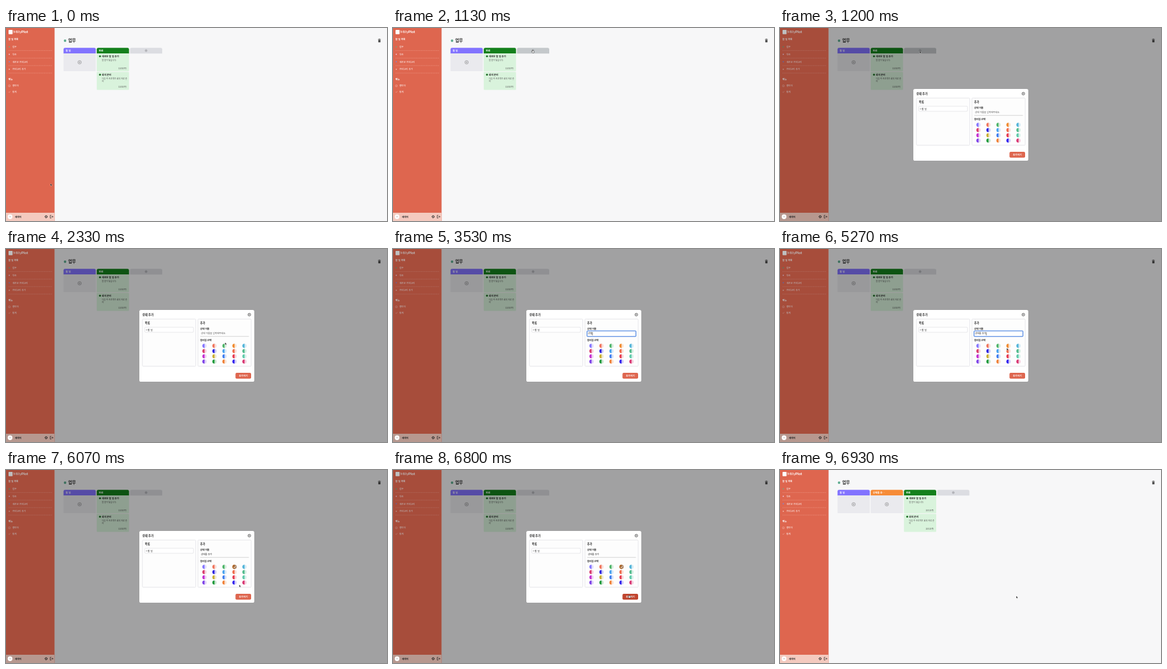
An HTML page for the animation above (7 s loop, 600 by 304 pixels).

```html
<!DOCTYPE html>
<html lang="ko">
<head>
<meta charset="utf-8">
<title>할 일 보드</title>
<style>
html, body { margin: 0; width: 100%; height: 100%; overflow: hidden; background: #f7f7f8; }
svg { display: block; width: 100vw; height: 100vh; }
text { font-family: "Noto Sans CJK KR", "Noto Sans CJK", "Noto Sans CJK JP", "Noto Sans", sans-serif; white-space: pre; }
.logo { font-family: Lato, "Open Sans", sans-serif; }
</style>
</head>
<body>
<svg id="stage" viewBox="0 0 600 304" preserveAspectRatio="none"></svg>
<script>
const stage = document.getElementById('stage');
const LOOP = 7000;
const CORAL = '#de664f';

function add(parent, tag, attrs = {}) {
  const node = document.createElementNS(stage.namespaceURI, tag);
  for (const key in attrs) node.setAttribute(key, attrs[key]);
  parent.append(node);
  return node;
}
const group = (parent, attrs) => add(parent, 'g', attrs);
const rect = (parent, x, y, width, height, fill, extra) =>
  add(parent, 'rect', { x, y, width, height, fill, ...extra });
const dot = (parent, cx, cy, r, fill, extra) => add(parent, 'circle', { cx, cy, r, fill, ...extra });
const path = (parent, d, extra) => add(parent, 'path', { d, fill: 'none', ...extra });

// y is the middle of the line
function label(parent, x, y, string, size, fill, weight = 400, extra) {
  const node = add(parent, 'text', {
    x, y: y + size * 0.36, 'font-size': size, fill, 'font-weight': weight, ...extra
  });
  node.textContent = string;
  return node;
}
function plus(parent, x, y, r, color) {
  dot(parent, x, y, r, 'none', { stroke: color, 'stroke-width': 0.55 });
  const a = r * 0.5;
  path(parent, `M${x - a} ${y}h${2 * a}M${x} ${y - a}v${2 * a}`, { stroke: color, 'stroke-width': 0.55 });
}
const roundTop = (x, y, w, h, r) =>
  `M${x} ${y + h}v${r - h}q0 ${-r} ${r} ${-r}h${w - 2 * r}q${r} 0 ${r} ${r}v${h - r}z`;

function drawSidebar() {
  const bar = group(stage);
  rect(bar, 0, 0, 76.5, 304, CORAL);
  rect(bar, 4, 3, 6.4, 6.8, '#fff', { rx: 0.8 });
  label(bar, 11.4, 6.3, 'Milly', 6, '#fff', 400, { class: 'logo' });
  label(bar, 24, 6.3, 'Plot', 6, '#fff', 700, { class: 'logo' });
  label(bar, 3.8, 17.6, '할 일 목록', 3.7, '#fff', 700);
  const items = [
    ['업무', 29.6, '#58b98c'], ['약속', 41.4, '#f3c9e4'],
    ['새로운 카테고리', 53.2, '#7f86d8'], ['카테고리 추가', 65, '#f2b7a8']
  ];
  for (const [name, y, color] of items) {
    dot(bar, 5.2, y, 0.9, color);
    label(bar, 10, y, name, 3.65, '#fff', 500);
    path(bar, `M4 ${y + 6}H73`, { stroke: '#f0a494', 'stroke-width': 0.5, 'stroke-dasharray': '1 .6' });
  }
  label(bar, 3.8, 81, '메뉴', 3.7, '#fff', 700);
  label(bar, 10, 91, '캘린더', 3.65, '#fff', 500);
  label(bar, 10, 100.5, '통계', 3.65, '#fff', 500);
  rect(bar, 4, 89.8, 2.6, 2.6, 'none', { stroke: '#f6c5ba', 'stroke-width': 0.5, rx: 0.4 });
  path(bar, 'M4 100.6l1 1 1.7-2', { stroke: '#f6c5ba', 'stroke-width': 0.5 });

  rect(bar, 0, 291, 76.5, 13, '#f4cabf');
  label(bar, 14, 297.3, '새싹이', 3.75, '#222', 700);
  dot(bar, 63.2, 297.2, 1.8, 'none', { stroke: '#222', 'stroke-width': 1, 'stroke-dasharray': '1 .4' });
  dot(bar, 63.2, 297.2, 1.3, 'none', { stroke: '#222', 'stroke-width': 0.6 });
  path(bar, 'M71.4 295h-1.8v4.4h1.8M71 297.2h3M72.9 295.9l1.3 1.3-1.3 1.3', { stroke: '#222', 'stroke-width': 0.65 });
}

function drawColumn(parent, x, name, color) {
  path(parent, roundTop(x, 31.2, 50.8, 9, 2.4), { fill: color });
  label(parent, x + 3.3, 35.6, name, 3.8, '#fff', 700);
}
function drawEmptyBody(parent, x) {
  rect(parent, x, 40, 50.8, 28, '#eaeaee', { rx: 0.8 });
  plus(parent, x + 25.3, 54, 2.7, '#777');
}
function drawCard(parent, y, title, lines, date) {
  rect(parent, 142.9, y, 50.8, 28.2, '#d9f3dc', { rx: 1 });
  dot(parent, 148, y + 4.4, 1.5, '#15681d');
  label(parent, 151, y + 4.4, title, 3.7, '#222', 700);
  lines.forEach((line, i) => label(parent, 151, y + 10.6 + i * 4.3, line, 3.2, '#555'));
  label(parent, 190, y + 23.4, date, 3.1, '#444', 400, { 'text-anchor': 'end' });
}

function drawBoard() {
  dot(stage, 93, 20, 1.9, '#58a98c');
  label(stage, 98, 19.6, '업무', 6.6, '#222', 700);
  path(stage, 'M585.8 18h4.4M587.1 17.4h1.8', { stroke: '#333', 'stroke-width': 0.8 });
  rect(stage, 586.3, 18.9, 3.4, 3.7, '#444', { rx: 0.5 });

  drawColumn(stage, 90.6, '할 일', '#8273ff');
  drawEmptyBody(stage, 90.6);

  const fresh = group(stage);
  drawColumn(fresh, 142.9, '상태를 추…', '#f68b37');
  drawEmptyBody(fresh, 142.9);

  const rest = group(stage);
  drawColumn(rest, 142.9, '완료', '#14801c');
  drawCard(rest, 40, '새로운 할 일 추가', ['할 말이 많습니다.'], '10/10(목)');
  drawCard(rest, 69.2, '회의 준비', ['다음 주 프로젝트 회의 자료 준', '비'], '10/10(목)');
  const adder = path(rest, roundTop(195.2, 31.2, 50.8, 9, 2.4), { fill: '#dcdde2' });
  plus(rest, 220.6, 35.6, 1.6, '#8a8a90');
  return { fresh, rest, adder };
}

const CHIPS = [
  '#8273ff', '#f0735a', '#4fb56a', '#f08a2e', '#4fb3d9',
  '#d93a6a', '#2b22e0', '#4aa3ef', '#ef6a4a', '#4fb98a',
  '#c22ad0', '#c9ad2f', '#3f7ff0', '#e63a50', '#5cc9a8',
  '#7c3fe8', '#1f9a3a', '#f0823a', '#3222ef', '#d93370'
];
function drawChip(parent, x, y, color) {
  const r = 3.3;
  dot(parent, x, y, r, color, { opacity: 0.22 });
  path(parent, `M${x} ${y - r}a${r} ${r} 0 0 0 0 ${2 * r}z`, { fill: color });
}

function drawModal() {
  const modal = group(stage);
  rect(modal, 76.5, 0, 523.5, 304, '#000', { opacity: 0.35 });
  rect(modal, 0, 0, 76.5, 304, '#000', { opacity: 0.25 });
  rect(modal, 210, 96, 181, 113, '#fff', { rx: 2.6 });
  label(modal, 214.8, 103.3, '상태 추가', 4.4, '#222', 700);
  dot(modal, 383.2, 103.4, 2.2, 'none', { stroke: '#222', 'stroke-width': 0.6 });
  path(modal, 'M382.2 102.4l2 2m0-2l-2 2', { stroke: '#222', 'stroke-width': 0.6 });

  const frame = { stroke: '#dedee2', 'stroke-width': 0.7, rx: 1.2 };
  rect(modal, 214.8, 110.3, 84, 74.4, '#fdfdfd', frame);
  rect(modal, 302.2, 110.3, 84, 74.4, '#fdfdfd', frame);
  label(modal, 218.8, 116.4, '목록', 4.3, '#222', 600);
  rect(modal, 218.6, 123.2, 76.6, 8, '#fff', frame);
  dot(modal, 221.2, 127.3, 0.6, '#444');
  label(modal, 223, 127.2, '할 일', 3.7, '#222', 500);

  label(modal, 305.8, 116.4, '추가', 4.3, '#222', 600);
  label(modal, 305.8, 125.4, '상태 이름', 3.65, '#222', 600);
  const line = path(modal, 'M306 137.7H382.5', { stroke: '#bbb', 'stroke-width': 0.6 });
  const ring = rect(modal, 305.6, 129, 77, 8.8, '#fff', { stroke: '#2f70dc', 'stroke-width': 1, rx: 0.6 });
  const field = label(modal, 307, 133.1, '', 3.6, '#222');
  const caret = rect(modal, 0, 131, 0.6, 5, '#222');
  label(modal, 305.8, 143.4, '컬러칩 선택', 3.65, '#222', 600);
  CHIPS.forEach((color, i) =>
    drawChip(modal, 312.6 + (i % 5) * 15.75, 152.6 + Math.floor(i / 5) * 8.2, color));
  const check = group(modal);
  dot(check, 359.9, 152.6, 3.3, '#7d4a20', { opacity: 0.65 });
  path(check, 'M358.2 152.7l1.3 1.4 2.3-2.8', { stroke: '#fff', 'stroke-width': 0.9 });

  const button = rect(modal, 361.4, 195, 24.6, 9.2, CORAL, { rx: 2 });
  label(modal, 373.7, 199.4, '추가하기', 3.75, '#fff', 700, { 'text-anchor': 'middle' });
  return { modal, line, ring, field, caret, check, button };
}

function drawCursor() {
  const cursor = group(stage);
  const arrow = path(cursor, 'M0 0v3.6l.9-.8.6 1.3.7-.3-.6-1.3h1.1z',
    { fill: '#111', stroke: '#fff', 'stroke-width': 0.3 });
  const hand = path(cursor, 'M-.6-1.3q.6-.8 1.1 0v1.4l1.4.4q.6.2.5.8l-.4 1.8h-2.5l-1.5-2 .4-.5 1 .6z',
    { fill: '#fff', stroke: '#222', 'stroke-width': 0.5 });
  return { cursor, arrow, hand };
}

rect(stage, 0, 0, 600, 304, '#f7f7f8');
drawSidebar();
const board = drawBoard();
const form = drawModal();
dot(stage, 6.4, 297.3, 3.7, '#fff');
dot(stage, 6.4, 297.3, 0.8, '#999');
const pointer = drawCursor();

// [time, x, y]
const ROUTE = [
  [0, 70, 245], [70, 70, 245], [400, 135, 140], [730, 208, 48], [930, 220, 36], [1200, 220, 36],
  [1470, 247, 100], [1700, 310, 150], [1930, 358, 176], [2070, 356, 172], [2470, 339, 134],
  [4930, 339, 134], [5270, 357, 156], [5530, 360, 153], [5670, 360, 153],
  [6330, 372, 198.5], [7000, 372, 198.5]
];
// [time, text], one Hangul composition step per key
const TYPING = [
  [0, ''], [2930, 'ㅅ'], [3030, '사'], [3130, '상'], [3270, '상ㅌ'], [3400, '상태'], [3530, '상탤'],
  [3670, '상태르'], [3800, '상태를'], [3930, '상태를 '], [4030, '상태를 ㅊ'], [4130, '상태를 추'],
  [4230, '상태를 추ㄱ'], [4330, '상태를 추가']
];
const OPEN = 1200, FOCUS = 2530, PICK = 5600, CLOSE = 6870;

function pointerAt(t) {
  const i = Math.max(1, ROUTE.findIndex(stop => stop[0] > t));
  const [t0, x0, y0] = ROUTE[i - 1], [t1, x1, y1] = ROUTE[i];
  const k = (t - t0) / (t1 - t0);
  return [x0 + (x1 - x0) * k, y0 + (y1 - y0) * k];
}
const show = (node, on) => node.setAttribute('visibility', on ? 'inherit' : 'hidden');
const within = (t, from, to) => t >= from && t < to;

function render(t) {
  const done = t >= CLOSE;
  show(board.fresh, done);
  board.rest.setAttribute('transform', `translate(${done ? 52.3 : 0} 0)`);
  board.adder.setAttribute('fill', within(t, 870, 1330) ? '#c4c8cb' : '#dcdde2');

  const focused = within(t, FOCUS, PICK);
  const typed = TYPING.findLast(step => step[0] <= t)[1];
  const hint = !typed;
  show(form.modal, within(t, OPEN, CLOSE));
  show(form.ring, focused);
  show(form.line, !focused);
  form.field.textContent = hint ? '상태 이름을 입력해주세요.' : typed;
  form.field.setAttribute('fill', hint ? '#555' : '#222');
  const width = hint ? 0 : form.field.getComputedTextLength();
  form.caret.setAttribute('x', 307.1 + width);
  show(form.caret, focused && !within(t, 4670, 5200));
  show(form.check, t >= PICK);
  form.button.setAttribute('fill', t >= 6230 ? '#c0452f' : CORAL);

  const [x, y] = pointerAt(t);
  const hand = within(t, 870, 1200) || within(t, 5400, 5730) || within(t, 6230, CLOSE);
  pointer.cursor.setAttribute('transform', `translate(${x} ${y})`);
  show(pointer.cursor, !within(t, 2930, 4930));
  show(pointer.arrow, !hand);
  show(pointer.hand, hand);
}

const start = performance.now();
function tick() {
  render((performance.now() - start) % LOOP);
  requestAnimationFrame(tick);
}
tick();
</script>
</body>
</html>
```
